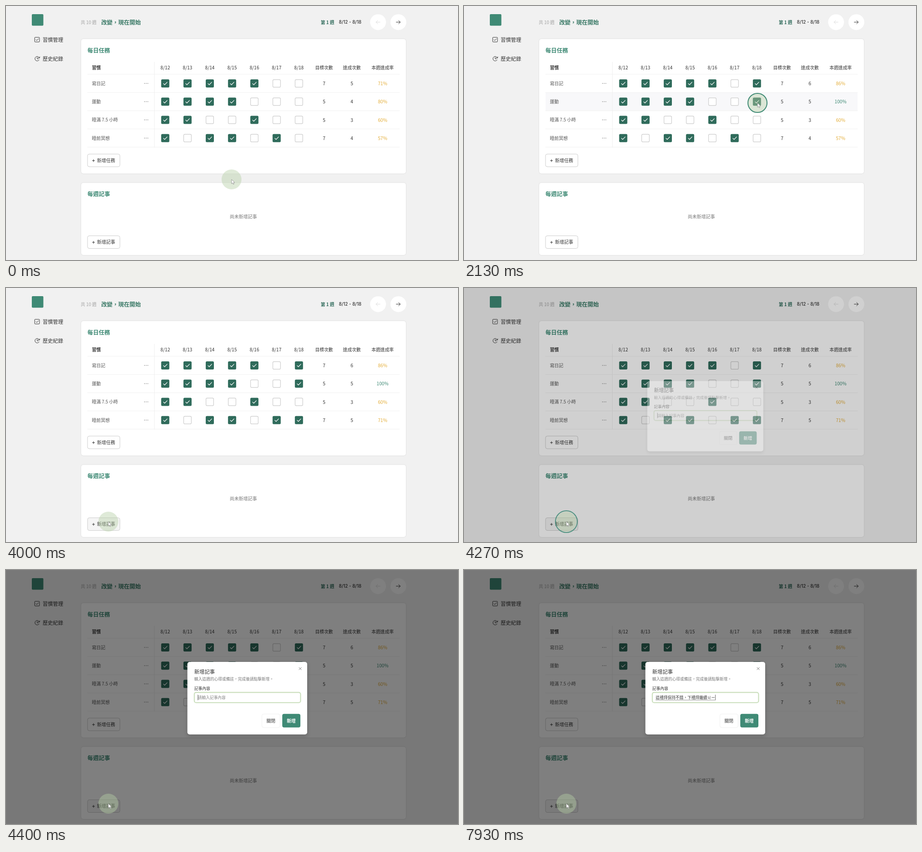
Recreate the animation shown at these times as an HTML page. Size 998x561 px, loop 8000 ms.

```html
<!DOCTYPE html>
<html lang="zh-Hant">
<head>
<meta charset="utf-8">
<title>習慣管理</title>
<style>
html, body { margin: 0; width: 100%; height: 100%; overflow: hidden; background: #f1f1f1; }
svg { display: block; width: 998px; height: 561px; }
text { font-family: "Noto Sans CJK TC", "Noto Sans CJK SC", "Noto Sans CJK JP", sans-serif; white-space: pre; }
.card { fill: #fff; filter: drop-shadow(0 .7px 1px #0002); }
.modal { fill: #fff; filter: drop-shadow(0 3px 4px #0003); }
.line { fill: none; stroke-linecap: round; stroke-linejoin: round; }
</style>
</head>
<body>
<svg viewBox="0 0 998 561">
  <g id="page"></g>
  <g id="table"></g>
  <g id="dialog"></g>
  <g id="pointer"></g>
</svg>
<script>
const LOOP = 8000;
const GREEN = '#3f8a75', DARK_GREEN = '#2f6b5b', AMBER = '#e4ae3a', INK = '#333';
const ROW_TOP = 171, ROW_STEP = 40.25;
const OPEN_AT = 4240, OPEN_MS = 150, RIPPLE_MS = 155;

const habits = [
  { name: '寫日記', checks: '1111100', goal: 7, tickAt: 1400 },
  { name: '運動', checks: '1111000', goal: 5, tickAt: 2130 },
  { name: '睡滿 7.5 小時', checks: '1100100', goal: 5, tickAt: Infinity },
  { name: '睡前冥想', checks: '1011010', goal: 7, tickAt: 2855 },
];

// time, x, y, eased
const route = [
  [300, 498, 383], [1180, 657, 179, 1], [1420, 656, 178],
  [1960, 648, 214, 1], [2150, 648, 214], [2680, 647, 285, 1],
  [2840, 647, 285], [3000, 570, 335], [3470, 430, 404], [3950, 226, 516],
];
const clicks = [
  [1400, 656, 178], [2130, 648, 214], [2855, 647, 285], [OPEN_AT, 226, 516],
];

const clamp = u => Math.min(1, Math.max(0, u));
const columnX = i => 351.6 + 49.2 * i;
const rowY = i => ROW_TOP + ROW_STEP * i;

// y is the vertical middle of the glyphs
function text(x, y, content, { size = 9.8, fill = INK, weight = 400, anchor = 'start', font = '' } = {}) {
  const family = font && `style="font-family:${font}"`;
  return `<text x="${x}" y="${y + size * 0.37}" font-size="${size}" fill="${fill}" font-weight="${weight}" text-anchor="${anchor}" ${family}>${content}</text>`;
}
const centered = (x, y, content, options) => text(x, y, content, { anchor: 'middle', ...options });
const rect = (x, y, w, h, attrs) => `<rect x="${x}" y="${y}" width="${w}" height="${h}" ${attrs}/>`;
const circle = (x, y, r, attrs) => `<circle cx="${x}" cy="${y}" r="${r}" ${attrs}/>`;
const line = (d, stroke = INK, width = 1) => `<path class="line" d="${d}" stroke="${stroke}" stroke-width="${width}"/>`;

function addButton(y, label, hovered) {
  return rect(180, y, 71.5, 28, `rx="4" fill="${hovered ? '#f5f5f5' : '#fff'}" stroke="#ccc"`)
    + line(`M190.7 ${y + 14.5}h5M193.2 ${y + 12}v5`)
    + text(201, y + 14.2, label, { size: 10 });
}

function checkbox(x, y, checked) {
  return checked
    ? rect(x - 9, y - 9, 18, 18, `rx="2.5" fill="${DARK_GREEN}"`)
      + line(`M${x - 4} ${y + .3}l2.7 2.7l5.5 -5.7`, '#fff', 1.2)
    : rect(x - 8.4, y - 8.4, 16.8, 16.8, 'rx="2.5" fill="#fff" stroke="#ccc" stroke-width="1.2"');
}

function pageMarkup() {
  const heading = { size: 12.5, fill: GREEN, weight: 700 };
  const menu = { size: 11.3, weight: 500 };
  return rect(57, 18, 25.5, 25.5, `rx="2" fill="${GREEN}"`)
    + rect(63.3, 69.2, 10.6, 10.2, `rx="1" fill="none" stroke="${INK}"`)
    + line('M66 74.3l2 2l3.6 -4')
    + text(81, 74.5, '習慣管理', menu)
    + line('M73.6 114.6a5 5 0 1 0 -.4 4.4M74.6 112.2l-.6 2.8l-2.8 -.5M68.9 113.6v3.2h2.4')
    + text(81, 117, '歷史紀錄', menu)
    + text(165, 36, '共 10 週', { fill: '#a2a2a2' })
    + text(210.3, 36, '改變，現在開始', { ...heading, fill: '#3b7a67' })
    + text(695, 36, '第 1 週', { fill: DARK_GREEN, weight: 700 })
    + text(735, 35.5, '8/12 - 8/18', { weight: 500, font: 'Inter,sans-serif' })
    + circle(821.5, 35.7, 17.5, 'fill="#fff"')
    + circle(866.3, 35.7, 17.5, 'fill="#fff"')
    + line('M826 35.7h-9M820.7 32l-3.8 3.7l3.8 3.7', '#ddd')
    + line('M861.5 35.7h9M866.8 32l3.8 3.7l-3.8 3.7')
    + rect(166, 73, 717, 297, 'rx="5" class="card"')
    + rect(166, 390.5, 717, 159.5, 'rx="5" class="card"')
    + text(179.7, 98, '每日任務', heading)
    + text(179.7, 415, '每週記事', heading)
    + centered(524, 465.5, '尚未新增記事', { size: 10, fill: '#777' })
    + addButton(327, '新增任務', false);
}

function tableMarkup(t, pointer) {
  const head = { weight: 500 };
  let out = text(189.8, 136, '習慣', { weight: 700 });
  for (let i = 0; i < 7; i++) out += centered(columnX(i), 136, `8/${12 + i}`, { size: 10.2, weight: 500 });
  out += centered(702.3, 136, '目標次數', head) + centered(763.7, 136, '達成次數', head)
    + centered(831.5, 136, '本週達成率', head);

  habits.forEach((habit, i) => {
    const y = rowY(i);
    const hovered = pointer.x > 180 && pointer.x < 869 && Math.abs(pointer.y - y) < ROW_STEP / 2;
    if (hovered) out += rect(180, y - 20, 689, ROW_STEP, 'fill="#f8f8fa"');
    const checks = [...habit.checks].map(Number);
    if (t >= habit.tickAt) checks[6] = 1;
    const done = checks.reduce((a, b) => a + b);
    const rate = Math.round(done / habit.goal * 100);
    out += text(189.8, y + .3, habit.name, { fill: '#555' });
    for (const dx of [-3.6, 0, 3.6]) out += circle(309.5 + dx, y, .75, 'fill="#555"');
    checks.forEach((checked, day) => out += checkbox(columnX(day), y, checked));
    out += centered(702.3, y + .3, habit.goal, { size: 10.2 })
      + centered(763.7, y + .3, done, { size: 10.2 })
      + centered(831.5, y + .3, rate + '%', { size: 10.2, weight: 500, fill: rate < 100 ? AMBER : GREEN });
  });
  for (let i = 0; i < 5; i++) out += line(`M180 ${rowY(i) - 20.2}H869`, '#f1f1f1');
  out += line('M327.5 124V312', '#eee');
  return out + addButton(507.5, '新增記事', pointer.y > 507 && pointer.x < 251);
}

// Every state of a phonetic input: symbols first, then the finished character
const inputStates = [''];
let finished = '';
for (const keys of 'ㄓㄜ這 ㄌㄧ禮 ㄅㄞ拜 ㄅㄠ保 ㄔ持 ㄅㄨ不 ㄘㄨㄛ錯 ， ㄒㄧㄚ下 ㄌㄧ禮 ㄅㄞ拜 ㄐㄧ繼 ㄒㄩ續 ㄐㄧㄚ加'.split(' ')) {
  for (let k = 1; k < keys.length; k++) inputStates.push(finished + keys.slice(0, k));
  finished += keys.at(-1);
  inputStates.push(finished);
}
const FIRST_CLAUSE = inputStates.findIndex(s => s.endsWith('，'));

function typedText(t) {
  const first = Math.floor(clamp((t - 4770) / 1670) * FIRST_CLAUSE);
  const second = Math.max(0, Math.floor((t - 6600) / 73.5));
  return inputStates[first + Math.min(second, 18)];
}

function dialogMarkup(t) {
  if (t < OPEN_AT) return '';
  const shown = 1 - (1 - clamp((t - OPEN_AT) / OPEN_MS)) ** 2;
  const size = 8.75;
  const typed = typedText(t);
  const end = 423.2 + typed.length * size;
  const field = typed
    ? text(423.2, 281.8, typed, { size }) + line(`M423.5 287.3H${end - .5}`, '#666', .7)
    : text(423.8, 281.8, '請輸入記事內容', { size, fill: '#858585' });
  return rect(0, 0, 998, 561, `fill="#000" opacity="${.5 * shown}"`)
    + `<g opacity="${shown}" transform="translate(532.8 283) scale(${.95 + .05 * shown}) translate(-532.8 -283)">`
    + rect(400.5, 203, 264.5, 160.3, 'rx="5" class="modal"')
    + text(415.8, 224.5, '新增記事', { size: 11.3, weight: 500 })
    + text(415.8, 240.8, '輸入這週的心得或備註，完成後請點擊新增。', { size, fill: '#777' })
    + text(415.8, 261.3, '記事內容', { size, weight: 500 })
    + line('M647 215.2l5.2 5.2M652.2 215.2l-5.2 5.2', '#666', .9)
    + rect(415.8, 270.3, 234.6, 22.7, 'rx="4" fill="#fff" stroke="#cbdfbd" stroke-width="2.2"')
    + field + line(`M${end + .6} 275.8v11.5`, INK, .8)
    + rect(565, 318, 40, 30, 'rx="4" fill="#fff" stroke="#f0f0f0"')
    + centered(584.8, 333.3, '關閉', { weight: 500 })
    + rect(610, 317.7, 40, 30, `rx="4" fill="${GREEN}"`)
    + centered(629.8, 333, '新增', { weight: 700, fill: '#fff' })
    + '</g>';
}

function pointerAt(t) {
  const next = route.findIndex(stop => stop[0] > t);
  if (next <= 0) {
    const [, x, y] = next ? route.at(-1) : route[0];
    return { x, y };
  }
  const [t0, x0, y0] = route[next - 1];
  const [t1, x1, y1, eased] = route[next];
  let u = (t - t0) / (t1 - t0);
  if (eased) u = u * u * (3 - 2 * u);
  return { x: x0 + (x1 - x0) * u, y: y0 + (y1 - y0) * u };
}

function pointerMarkup(t, { x, y }) {
  const halo = pointerAt(t - 50);
  let out = circle(halo.x, halo.y, 22, 'fill="#b4ce a5" fill-opacity=".43"'.replace(' a5', 'a5'));
  for (const [at, cx, cy] of clicks) {
    const age = t - at;
    if (age >= 0 && age < RIPPLE_MS) {
      out += circle(cx, cy, 21 + age * .1, `fill="none" stroke="${GREEN}" stroke-width="2" opacity="${1 - .72 * age / RIPPLE_MS}"`);
    }
  }
  return out + `<path d="M${x} ${y}v9.6l2.3 -2l1.6 3.4l1.6 -.8l-1.5 -3.2h3z" fill="#fff" stroke="#888" stroke-width=".8" stroke-linejoin="round"/>`;
}

const layer = id => document.getElementById(id);
layer('page').innerHTML = pageMarkup();

function frame() {
  const t = performance.now() % LOOP;
  const pointer = pointerAt(t);
  layer('table').innerHTML = tableMarkup(t, pointer);
  layer('dialog').innerHTML = dialogMarkup(t);
  layer('pointer').innerHTML = pointerMarkup(t, pointer);
  requestAnimationFrame(frame);
}
frame();
</script>
</body>
</html>
```
